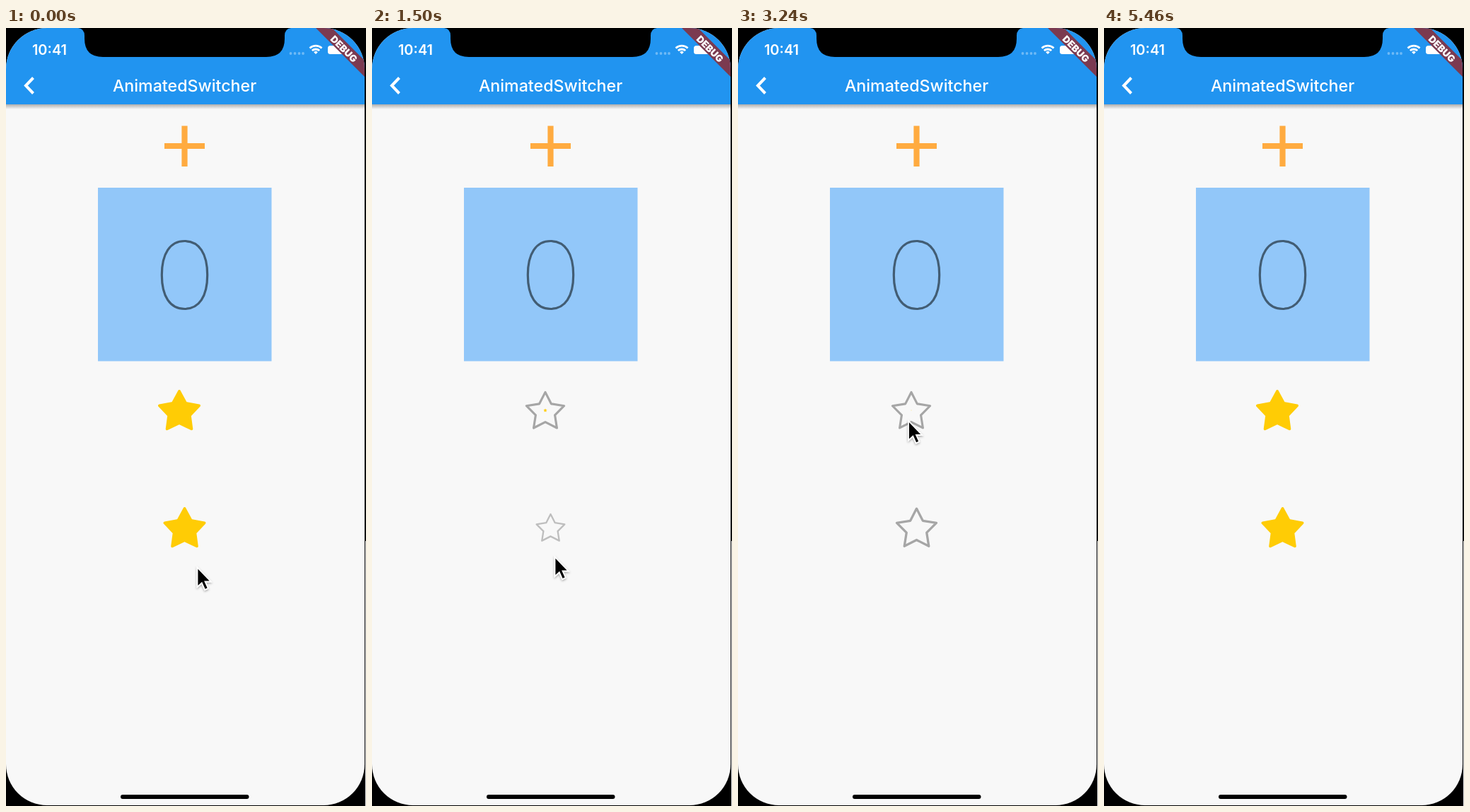
An HTML page for the animation above (5520 ms loop, 509x1101 px).

```html
<!DOCTYPE html>
<html lang="en">
<head>
<meta charset="utf-8">
<title>AnimatedSwitcher</title>
<style>
html, body { margin: 0; width: 100%; height: 100%; overflow: hidden; background: #000; }
svg { display: block; width: 509px; height: 1101px; }
text { font-family: Inter, Roboto, sans-serif; fill: #fff; text-anchor: middle; }
.on { fill: #ffcc05; stroke: #ffcc05; stroke-width: 4; stroke-linejoin: round; }
.off { fill: none; stroke: #a6a6a6; stroke-width: 3.3; stroke-linejoin: round; }
</style>
</head>
<body>
<svg viewBox="0 0 509 1101">
  <defs>
    <clipPath id="screen"><rect width="507" height="1100" rx="58"/></clipPath>
    <linearGradient id="shade" x2="0" y2="1">
      <stop stop-opacity=".3"/><stop offset="1" stop-opacity="0"/>
    </linearGradient>
    <filter id="soft" x="-50%" y="-50%" width="200%" height="200%">
      <feDropShadow dx="0" dy="1.5" stdDeviation="1.5" flood-opacity=".35"/>
    </filter>
  </defs>
  <rect width="509" height="1101"/>
  <path d="M508 726h1v375h-1z" fill="#eee"/>
  <g clip-path="url(#screen)">
    <rect width="507" height="1101" fill="#f8f8f8"/>
    <rect y="108" width="507" height="7" fill="url(#shade)"/>
    <rect width="507" height="108" fill="#2194f0"/>
    <path d="M102 0Q111 1 111 11V15Q111 41 137 41H368Q394 41 394 15V11Q394 1 403 0Z"/>
    <text x="61.5" y="38" font-size="20" font-weight="600">10:41</text>
    <text x="252.5" y="89.5" font-size="23.2" font-weight="500">AnimatedSwitcher</text>
    <path d="M38.5 70.5L28 81.5l10.5 11" fill="none" stroke="#fff" stroke-width="4"/>
    <g fill="#fff" fill-opacity=".35">
      <circle cx="402.5" cy="36" r="1.9"/><circle cx="408.5" cy="36" r="1.9"/>
      <circle cx="414.5" cy="36" r="1.9"/><circle cx="420" cy="36" r="1.9"/>
    </g>
    <g fill="none" stroke="#fff" stroke-width="2.8">
      <path d="M429.5 28.5a12.5 12.5 0 0 1 17 0M432.8 32a7.8 7.8 0 0 1 10.4 0"/>
      <path d="M435.2 34.2L438 37l2.8-2.8a4 4 0 0 0-5.6 0z" fill="#fff" stroke="none"/>
    </g>
    <rect x="455" y="25" width="24" height="12" rx="3.5" fill="#fff"/>
    <path d="M438 0H461L509 48V71Z" fill="#7b3a50"/>
    <text transform="translate(478 29.5) rotate(45)" y="5" font-size="13.5" font-weight="900">DEBUG</text>
    <path d="M252.5 138.5V196M224 167H281" stroke="#ffab40" stroke-width="8.2"/>
    <rect x="130" y="226" width="245.5" height="245.5" fill="#92c7f9"/>
    <path aria-label="0" fill="none" stroke="#425d74" stroke-width="3.2"
      d="M252.5 301.5C273 301.5 284.7 319 284.7 349.5S273 397.5 252.5 397.5 220.3 380 220.3 349.5 232 301.5 252.5 301.5Z"/>
    <g id="plain"><path class="off"/><path class="on"/></g>
    <g id="burst"><path class="off"/><path class="on"/><g id="dots" fill="#ffcc05"></g></g>
    <rect x="162" y="1085" width="181.5" height="6" rx="3"/>
  </g>
  <path id="cursor" d="M0 0V27.5L6.3 21.8 10.7 31.5 15.3 29.4 11 20H19.2Z"
    stroke="#fff" stroke-width="1.8" filter="url(#soft)"/>
</svg>
<script>
const LOOP = 5520, STEP = 60, SWITCH = 600;
const $ = id => document.getElementById(id);
const clamp = x => Math.max(0, Math.min(1, x));

// Toggle times; states alternate off, on, off, on
const plainTaps = [482, 1452, 2670, 3861];
const burstTaps = [482, 1452, 2670, 3560];
// Pointer stops: time, x, y
const stops = [
  [0, 270.5, 763.5], [60, 270.5, 763.5], [240, 258.5, 748.5],
  [2100, 258.5, 748.5], [2580, 241, 556], [4800, 241, 556],
  [4980, 262, 610], [5100, 262, 610], [5460, 320, 1130], [5520, 320, 1130]
];

function starPath(outer, inner) {
  const points = Array.from({ length: 10 }, (_, i) => {
    const r = i % 2 ? inner : outer, a = i * Math.PI / 5 - Math.PI / 2;
    return `${r * Math.cos(a)} ${r * Math.sin(a) + 2.5}`;
  });
  return `M${points.join('L')}Z`;
}
document.querySelectorAll('.on').forEach(p => p.setAttribute('d', starPath(29.4, 15.5)));
document.querySelectorAll('.off').forEach(p => p.setAttribute('d', starPath(29.4, 15)));

const dots = Array.from({ length: 12 }, (_, i) => {
  const dot = document.createElementNS('http://www.w3.org/2000/svg', 'circle');
  dot.setAttribute('r', i % 2 ? 1.2 : 2.3);
  return $('dots').appendChild(dot);
});

function bounceOut(x) {
  const k = 7.5625;
  if (x < 1 / 2.75) return k * x * x;
  if (x < 2 / 2.75) return k * (x - 1.5 / 2.75) ** 2 + .75;
  if (x < 2.5 / 2.75) return k * (x - 2.25 / 2.75) ** 2 + .9375;
  return k * (x - 2.625 / 2.75) ** 2 + .984375;
}

function stateAt(taps, t) {
  const count = taps.filter(tap => tap <= t).length;
  return { on: count % 2 === 0, age: count ? t - taps[count - 1] : 9999 };
}

function show(star, x, y, scale, opacity) {
  star.setAttribute('transform', `translate(${x} ${y}) scale(${scale})`);
  star.setAttribute('opacity', scale > 0 ? opacity : 0);
}

function drawPlain(t) {
  const { on, age } = stateAt(plainTaps, t), p = clamp(age / SWITCH);
  const [off, lit] = $('plain').children;
  show(on ? lit : off, 245, 541, p, 1);
  show(on ? off : lit, 245, 541, 1 - bounceOut(p), 1);
}

function drawBurst(t) {
  const { on, age } = stateAt(burstTaps, t);
  const [off, lit] = $('burst').children;
  const leaving = clamp(1 - age / 165), entering = clamp((age - 170) / 330);
  show(on ? lit : off, 252.5, 707, entering, Math.min(1, entering * 1.15));
  show(on ? off : lit, 252.5, 707, leaving, leaving);

  const p = clamp((age - 170) / 390);
  $('dots').setAttribute('opacity', on && p > 0 ? 1 - p ** 3 : 0);
  dots.forEach((dot, i) => {
    const inner = i % 2;
    const r = (inner ? 36.5 : 44) * (1 - (1 - p) ** 2);
    const a = (16.5 + 60 * (i >> 1) + inner * 10) * Math.PI / 180;
    dot.setAttribute('cx', 252.5 + r * Math.cos(a));
    dot.setAttribute('cy', 707 - r * Math.sin(a));
  });
}

function drawCursor(t) {
  const i = stops.findIndex(stop => stop[0] > t);
  const [t0, x0, y0] = stops[i - 1], [t1, x1, y1] = stops[i];
  const p = (t - t0) / (t1 - t0), e = p * p * (3 - 2 * p);
  $('cursor').setAttribute('transform', `translate(${x0 + (x1 - x0) * e} ${y0 + (y1 - y0) * e})`);
}

function frame() {
  const t = Math.floor(performance.now() % LOOP / STEP) * STEP;
  drawPlain(t);
  drawBurst(t);
  drawCursor(t);
  requestAnimationFrame(frame);
}
frame();
</script>
</body>
</html>
```
